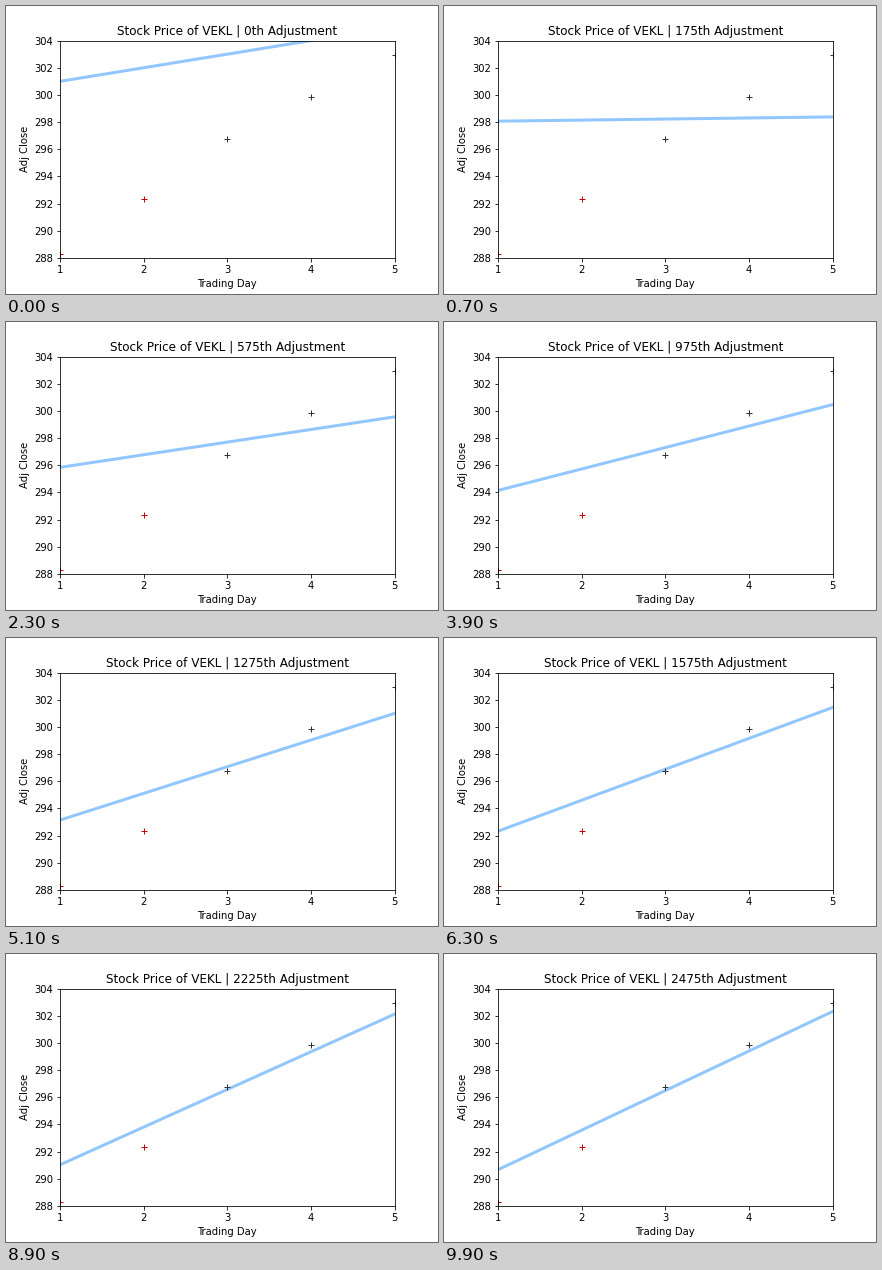
Write a matplotlib script that moves like this. It is 432 px wide and 288 px high and loops after 10 s.

```python
import matplotlib.pyplot as plt
import numpy as np
from matplotlib.animation import FuncAnimation

FRAMES, STEP, RATE = 100, 25, 0.004

days = np.arange(1, 6)
prices = np.array([288.29, 292.37, 296.76, 299.82, 302.92])


def descend(slope=1.0, intercept=300.0):
    """Fit a line by gradient descent, keeping every STEP-th state."""
    states = []
    for i in range(FRAMES * STEP):
        if i % STEP == 0:
            states.append((slope, intercept))
        error = slope * days + intercept - prices
        slope -= RATE * np.mean(error * days)
        intercept -= RATE * np.mean(error)
    return states


fits = descend()

plt.rcParams["font.family"] = "DejaVu Sans"
fig, ax = plt.subplots(figsize=(6, 4), dpi=72)
fig.subplots_adjust(left=0.125, right=0.9, bottom=0.125, top=0.88)
ax.set(xlim=(1, 5), ylim=(288, 304), xticks=days, yticks=range(288, 305, 2),
       xlabel="Trading Day", ylabel="Adj Close")

line, = ax.plot([], [], color="#92c6ff", lw=3)
for part, color in ((slice(0, 2), "#cc0000"), (slice(2, 5), "#333333")):
    ax.plot(days[part], prices[part], "+", color=color, ms=6, mew=1)
title = ax.set_title("")


def update(i):
    slope, intercept = fits[i]
    line.set_data(days, slope * days + intercept)
    title.set_text(f"Stock Price of VEKL | {i * STEP}th Adjustment")
    return line, title


anim = FuncAnimation(fig, update, frames=FRAMES, interval=100, repeat=True)
plt.show()
```
